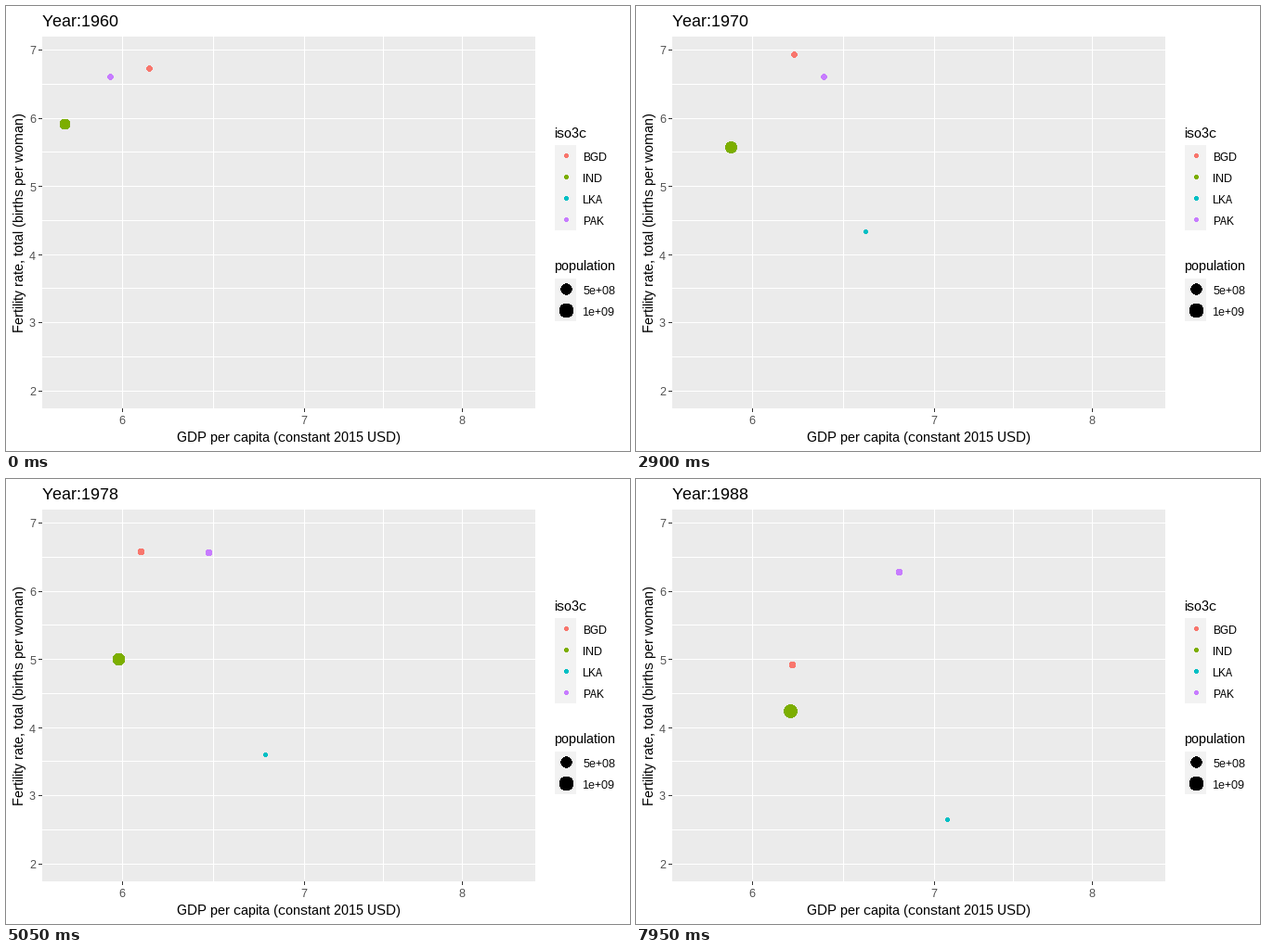
These frames come from a looping animation (672 px wide and 480 px high, 8000 ms). A matplotlib script:

```python
import numpy as np
import matplotlib
import matplotlib.pyplot as plt
from matplotlib.animation import FuncAnimation
from matplotlib.patches import Circle, Rectangle

W, H, DPI = 672, 480, 96
FRAMES, STEP_MS = 160, 50
RATE = 0.1748                # years per frame
START = 1960
LEFT, TOP, RIGHT, BOTTOM = 39, 33, 570, 434
POP_MIN, POP_SPAN = 9.9e6, 1.4e9

# whole-pixel glyph hinting, no kerning
matplotlib.rcParams.update({
    "font.family": "Liberation Sans",
    "text.hinting": "native",
    "text.hinting_factor": 1,
    "text.kerning_factor": 6,
})
TITLE, AXIS, SMALL = 18, 15, 12      # text heights in px

# turns: (years since start, stage x); births: fertility every four years
SERIES = {
    "BGD": dict(
        color="#F8766D", pop=50e6, growth=0.025,
        turns=[(0, 154), (4, 173), (6, 169.5), (7, 159.5), (10, 173.5),
               (12, 126.5), (13, 129.5), (14, 145.5), (15, 132),
               (18, 147.5), (24, 163), (28, 168.5)],
        births=[6.73, 6.85, 6.94, 6.92, 6.74, 6.35, 5.69, 4.88]),
    "IND": dict(
        color="#7CAE00", pop=446e6, growth=0.0222,
        turns=[(0, 63), (2, 68), (4, 88), (6, 73.4), (7, 85), (10, 103),
               (14, 95), (18, 124.4), (19, 108), (23, 136.8), (27, 154.5),
               (28, 169.3)],
        births=[5.91, 5.86, 5.71, 5.46, 5.12, 4.83, 4.57, 4.225]),
    "LKA": dict(
        color="#00BFC4", pop=9.9e6, growth=0.0188,
        turns=[(1, 212), (5, 218.5), (9, 247.8), (12, 246), (15, 264.6),
               (18, 281), (26, 332.8), (28, 335.9)],
        births=[5.5, 5.08, 4.6, 4.11, 3.72, 3.42, 3.01, 2.625]),
    "PAK": dict(
        color="#C77CFF", pop=46e6, growth=0.029,
        turns=[(0, 112), (2, 123.5), (5, 161.5), (9, 187), (10, 203),
               (12, 195), (13, 204), (17, 213.5), (20, 236.2), (28, 285)],
        births=[6.6, 6.6, 6.6, 6.6, 6.6, 6.53, 6.42, 6.275]),
}


def x_px(log_gdp):
    return 125.5 + 1271.5 * np.log(log_gdp / 6)


def y_px(fertility):
    return 47.5 + (7 - fertility) * 73.57


def dot_radius(size):
    # half a pixel less, since unsmoothed fills cover every touched pixel
    return (size * 2.845 + 0.945) / 2 - 0.5


def pop_radius(pop):
    share = max(pop - POP_MIN, 0) / POP_SPAN
    return dot_radius(1 + 5 * np.sqrt(share))


fig = plt.figure(figsize=(W / DPI, H / DPI), dpi=DPI, facecolor="white")
ax = fig.add_axes([0, 0, 1, 1])
ax.set_xlim(0, W)
ax.set_ylim(H, 0)
ax.axis("off")


def rect(x, y, w, h, color):
    ax.add_patch(Rectangle((x, y), w, h, fc=color, lw=0, antialiased=False))


def dot(x, y, r, color):
    return ax.add_patch(Circle((x, y), r, fc=color, lw=0, antialiased=False))


def label(x, y, text, px, color="black", **kw):
    return ax.text(x, y, text, fontsize=px * 72 / DPI, color=color,
                   va="baseline", **kw)


def legend(title, base, top, entries):
    label(590, base, title, AXIS)
    rect(591, top, 23, 23 * len(entries), "#F2F2F2")
    for i, (name, r, color) in enumerate(entries):
        y = top + 11.5 + 23 * i
        dot(603.5, y, r, color)
        label(621, y + 5.5, name, SMALL)


# panel, grid, ticks
rect(LEFT, TOP, RIGHT - LEFT, BOTTOM - TOP, "#EBEBEB")
for value in np.arange(2, 7.5, 0.5):
    row = int(y_px(value))
    rect(LEFT, row, RIGHT - LEFT, 1, "white")
    if value % 1 == 0:
        rect(LEFT - 4, row, 4, 1, "#333333")
        label(32, row + 5.5, f"{value:.0f}", SMALL, "#4D4D4D", ha="right")
for value in (6, np.sqrt(42), 7, np.sqrt(56), 8):
    col = int(x_px(value))
    rect(col, TOP, 1, BOTTOM - TOP, "white")
    if value in (6, 7, 8):
        rect(col, BOTTOM, 1, 4, "#333333")
        label(col, 451, f"{value}", SMALL, "#4D4D4D", ha="center")

label(304, 470, "GDP per capita (constant 2015 USD)", AXIS, ha="center")
label(19.5, 233, "Fertility rate, total (births per woman)", AXIS,
      rotation=90, rotation_mode="anchor", ha="center")
title = label(LEFT, 22, "", TITLE)

legend("iso3c", 142, 150,
       [(name, dot_radius(1.5), s["color"]) for name, s in SERIES.items()])
legend("population", 285, 294,
       [("5e+08", pop_radius(5e8), "black"),
        ("1e+09", pop_radius(1e9), "black")])

dots = {name: dot(0, 0, 1, s["color"]) for name, s in SERIES.items()}


def draw(k):
    t = k * RATE
    title.set_text(f"Year:{START + round(t)}")
    for name, s in SERIES.items():
        years, xs = zip(*s["turns"])
        x = np.interp(t, years, xs)
        y = y_px(np.interp(t / 4, range(8), s["births"]))
        d = dots[name]
        d.center = (np.floor(x) + 0.5, np.floor(y) + 0.5)
        d.set_radius(pop_radius(s["pop"] * np.exp(s["growth"] * t)))
        d.set_visible(t >= years[0])
    return [title, *dots.values()]


anim = FuncAnimation(fig, draw, frames=FRAMES, interval=STEP_MS, repeat=True,
                     repeat_delay=0, init_func=lambda: draw(0))
plt.show()
```
